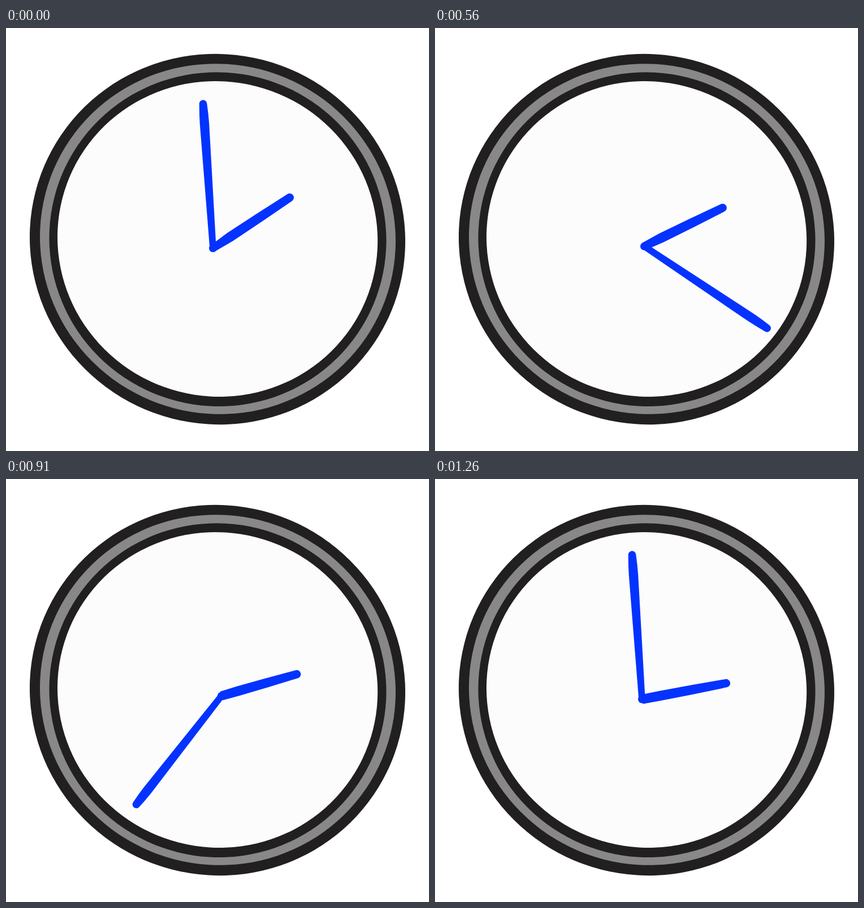
Animation, 748 px wide and 748 px high, one loop 1.68 s. Source, as an HTML page:

```html
<!DOCTYPE html>
<html lang="en">
<head>
<meta charset="utf-8">
<title>Clock</title>
<style>
html, body { margin: 0; width: 100%; height: 100%; overflow: hidden; background: #fff; }
svg { display: block; width: 100vw; height: 100vh; }
</style>
</head>
<body>
<svg viewBox="0 0 748 748">
  <ellipse cx="374" cy="373.5" rx="332.7" ry="327" transform="rotate(20 374 373.5)" fill="#211f20"/>
  <ellipse cx="374.5" cy="373" rx="315.2" ry="309.1" transform="rotate(20 374.5 373)" fill="#888"/>
  <ellipse cx="374.5" cy="373.6" rx="298.4" ry="295" transform="rotate(20 374.5 373.6)" fill="#211f20"/>
  <ellipse cx="374.1" cy="373" rx="283.7" ry="278.4" transform="rotate(20 374.1 373)" fill="#fcfcfc"/>
  <g fill="#0433ff">
    <path id="hour"/>
    <path id="minute"/>
    <circle id="joint" r="7"/>
  </g>
</svg>
<script>
const STEP = 70, LOOP = 1680, LAST = 18;
const CENTER = { x: 374, y: 386 };
const $ = id => document.getElementById(id);
const mix = (a, b, k) => a + (b - a) * k;

// key poses of the hand-drawn minute hand; angles run clockwise from twelve
const keys = [
  { step: 0, x: 366, y: 389.5, angle: -3.9, len: 256 },
  { step: 3, x: 363.5, y: 388.5, angle: 25.8, len: 262 },
  { step: 6, x: 364, y: 385, angle: 68.3, len: 260 },
  { step: 8, x: 370, y: 386, angle: 123.7, len: 261 },
  { step: 10, x: 372.5, y: 386, angle: 173.8, len: 252 },
  { step: 13, x: 381, y: 383.5, angle: 218.1, len: 244 },
  { step: 16, x: 380, y: 384, angle: 297.8, len: 243 },
  { step: LAST, x: 366, y: 389.5, angle: 356.1, len: 256 }
];

function poseAt(step) {
  const i = Math.max(1, keys.findIndex(k => k.step >= step));
  const a = keys[i - 1], b = keys[i];
  const k = (step - a.step) / (b.step - a.step);
  const get = name => mix(a[name], b[name], k);
  return { x: get("x"), y: get("y"), angle: get("angle"), len: get("len") };
}

// the hour hand's tip eases along an arc around the dial centre
function hourTip(ease) {
  const a = mix(-34, -10, ease) * Math.PI / 180, r = mix(154, 143, ease);
  return { x: CENTER.x + r * Math.cos(a), y: CENTER.y + r * Math.sin(a) };
}

// tapered hand: half-width at the base, at the bulge and at the round tip
function drawHand(id, { x, y }, deg, len, base, at, bulge, tip) {
  const s = len * at, m = (s + len) / 2;
  $(id).setAttribute("d",
    `M0 ${-base}L${s} ${-bulge}Q${m} ${-bulge} ${len} ${-tip}` +
    `A${tip} ${tip} 0 0 1 ${len} ${tip}Q${m} ${bulge} ${s} ${bulge}L0 ${base}Z`);
  $(id).setAttribute("transform", `translate(${x} ${y})rotate(${deg})`);
}

function draw(ms) {
  const step = Math.min(LAST, Math.floor(ms % LOOP / STEP));
  const pose = poseAt(step);
  drawHand("minute", pose, pose.angle - 90, pose.len, 5.7, 0.86, 8.2, 6.8);

  const u = (step / LAST) ** 1.25, ease = u * u * (3 - 2 * u);
  const tip = hourTip(ease), dx = tip.x - pose.x, dy = tip.y - pose.y;
  drawHand("hour", pose, Math.atan2(dy, dx) * 180 / Math.PI, Math.hypot(dx, dy),
    mix(6.5, 8.5, ease), 0.22, 8.6, 7.3);

  $("joint").setAttribute("cx", pose.x);
  $("joint").setAttribute("cy", pose.y);
}

const start = performance.now();
function tick() {
  draw(performance.now() - start);
  requestAnimationFrame(tick);
}
tick();
</script>
</body>
</html>
```
